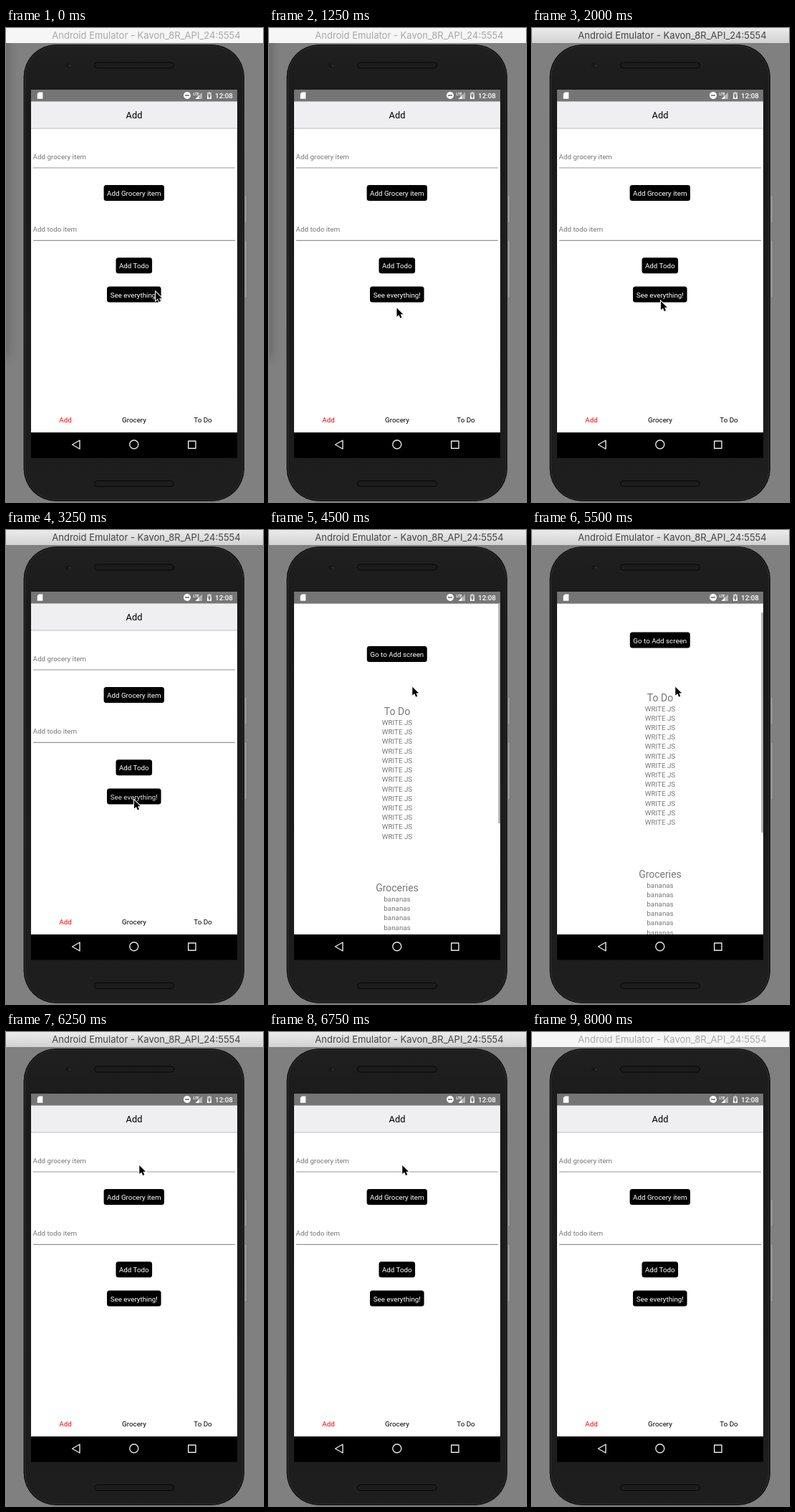
These frames come from a looping animation (359x661 px, 8.25 s). An HTML page:

```html
<!DOCTYPE html>
<html lang="en">
<head>
<meta charset="utf-8">
<title>Grocery and todo app</title>
<style>
  html, body { margin: 0; width: 100%; height: 100%; overflow: hidden; background: #808080; }
  svg { display: block; }
  text { font: 9.8px Roboto, sans-serif; text-anchor: middle; }
  .left { text-anchor: start; fill: #777; }
  .head { font-size: 14px; }
  .title { font: 13px Inter, sans-serif; }
  #list text { fill: #777; }
  #list .btn, .btn { fill: #fff; }
  #shadow { filter: blur(7px); }
</style>
</head>
<body>
<svg width="359" height="661" viewBox="0 0 359 661">
  <defs>
    <linearGradient id="bar" x2="0" y2="1"><stop stop-color="#ebebeb"/><stop offset="1" stop-color="#d2d2d2"/></linearGradient>
    <linearGradient id="body" x2="0" y2="1"><stop stop-color="#1f1f1f"/><stop offset=".15" stop-color="#1a1a1a"/><stop offset="1" stop-color="#1e1e1e"/></linearGradient>
    <clipPath id="view"><rect x="35" y="102.7" width="288" height="461.3"/></clipPath>
  </defs>

  <rect width="359" height="661" fill="#808080"/>
  <rect id="shadow" x="-20" width="24" height="460" opacity=".2"/>
  <rect id="titleBar" width="359" height="21"/>
  <text id="title" class="title" x="196" y="15">Android Emulator - Kavon_8R_API_24:5554</text>

  <!-- phone -->
  <g fill="#999" stroke="#6c6c6c" stroke-width=".6">
    <rect x="333.5" y="233" width="3" height="38"/>
    <rect x="333.5" y="296" width="3" height="80"/>
  </g>
  <rect x="24" y="22.5" width="309.5" height="638" rx="46" fill="#111" stroke="#909090" stroke-width=".9"/>
  <rect x="26.5" y="25" width="304.5" height="633" rx="43.5" fill="url(#body)" stroke="#303030"/>
  <g fill="#1c1c1c" stroke="#060606">
    <rect x="123.5" y="48" width="111" height="8" rx="4"/>
    <rect x="123.5" y="631.5" width="111" height="8" rx="4"/>
  </g>
  <circle cx="86" cy="52" r="3" fill="#171717"/>
  <circle cx="89" cy="52.5" r="1" fill="#444"/>

  <!-- status bar -->
  <rect x="35" y="86" width="288" height="17" fill="#757575"/>
  <g fill="#fff">
    <path d="M46 89.5H51.3V98.7H43.7V91.8Z"/>
    <circle cx="253" cy="94" r="5"/>
    <path d="M274 89.5V99H264.5Z" opacity=".45"/>
    <path d="M269.5 94V99H264.5Z"/>
    <text x="265.5" y="93.5" style="font-size:5px;font-weight:700">LTE</text>
    <path d="M283 89H285V90H287V99H281V90H283Z" opacity=".6"/>
    <path d="M281 94H287V99H281Z"/>
    <text x="304.5" y="97.7" style="font-weight:500">12:08</text>
  </g>
  <path d="M250 94H256M284.5 92L283 95H285L283.5 98" fill="none" stroke="#666" stroke-width="1.3"/>

  <rect x="35" y="102.7" width="288" height="461.3" fill="#fff"/>

  <g id="add">
    <rect x="35" y="102.7" width="288" height="37.3" fill="#efeff2"/>
    <path d="M35 140H323" stroke="#bcbcc0"/>
    <text x="179" y="126.3" style="font-size:12.8px">Add</text>
    <path d="M38 195H320M38 296.3H320" stroke="#959595" stroke-width="1.2"/>
    <text class="left" x="37.6" y="183.2">Add grocery item</text>
    <text class="left" x="37.6" y="284.3">Add todo item</text>
    <text x="83" y="550.3" fill="#f00">Add</text>
    <text x="179" y="550.3">Grocery</text>
    <text x="275" y="550.3">To Do</text>
  </g>

  <g id="list" clip-path="url(#view)">
    <g id="content"></g>
    <rect id="thumb" x="320.3" width="2.7" y="102" height="307" fill="#b0b0b0"/>
  </g>

  <rect x="35" y="564" width="288" height="35.5"/>
  <g fill="none" stroke="#e8e8e8" stroke-width="1.4" stroke-linejoin="round">
    <path d="M92.5 581L103 575V587Z"/>
    <circle cx="178.8" cy="580.8" r="6"/>
    <rect x="254.7" y="576" width="10.3" height="10.3"/>
  </g>
  <path id="cursor" d="M0 0V12L2.9 9.4L4.9 14L7 13.1L5.1 8.7H8.8Z" stroke="#fff" stroke-width="2" paint-order="stroke"/>
</svg>
<script>
  const LOOP = 8250;
  const $ = id => document.getElementById(id);
  const add = $('add'), list = $('list'), content = $('content'), cursor = $('cursor');

  function make(parent, tag, attrs, label = '') {
    const el = document.createElementNS('http://www.w3.org/2000/svg', tag);
    for (const key in attrs) el.setAttribute(key, attrs[key]);
    el.textContent = label;
    parent.append(el);
    return el;
  }

  function button(parent, y, width, label) {
    make(parent, 'rect', { x: 178.8 - width / 2, y, width, height: 22, rx: 3.5 });
    return make(parent, 'text', { class: 'btn', x: 178.8, y: y + 15 }, label);
  }

  function section(y, heading, item, count) {
    make(content, 'text', { class: 'head', x: 179, y }, heading);
    for (let i = 0; i < count; i++)
      make(content, 'text', { x: 179, y: y + 14 + i * 13.22 }, item);
  }

  button(add, 219, 84.4, 'Add Grocery item');
  button(add, 320.2, 50.6, 'Add Todo');
  const seeAll = button(add, 360.5, 75.6, 'See everything!');
  button(content, 162, 84, 'Go to Add screen');
  section(258, 'To Do', 'WRITE JS', 13);
  section(504, 'Groceries', 'bananas', 9);

  // Each step holds from its time until the next: [ms, ...values]
  const moves = [
    [0, 209, 368], [250, 208.5, 371], [500, 201.5, 389.5], [750, 172.5, 441.5],
    [1000, 167.5, 448.5], [1250, 178.5, 390.5], [1500, 180, 381], [2750, 179.5, 380],
    [3000, 179, 376.5], [4250, 207, 279.5], [4500, 200.3, 218.7],
    [6250, 186.3, 186], [7250, 162.5, 241.5], [7500, 118.5, 299.5]
  ];
  const scrolls = [[0, 0], [5000, 10.5], [5250, 12], [5500, 19.5]];
  const at = (steps, t) => steps.findLast(s => s[0] <= t);
  const show = (el, on) => el.setAttribute('visibility', on ? 'visible' : 'hidden');

  function draw() {
    const t = performance.now() % LOOP;
    const active = t >= 2000 && t < 8000;
    const listOpen = t >= 3500 && t < 6000;
    const [, x, y] = at(moves, t);
    const scroll = at(scrolls, t)[1];

    $('titleBar').setAttribute('fill', active ? 'url(#bar)' : '#f6f6f6');
    $('title').setAttribute('fill', active ? '#444' : '#a8a8a8');
    show($('shadow'), t < 2000);
    show(add, !listOpen);
    show(list, listOpen);
    show(cursor, t < 7750);
    seeAll.style.opacity = t >= 3250 && t < 3500 ? .88 : 1;
    cursor.setAttribute('transform', `translate(${x} ${y})`);
    content.setAttribute('transform', `translate(0 ${-scroll})`);
    $('thumb').setAttribute('transform', `translate(0 ${scroll * .665})`);
    requestAnimationFrame(draw);
  }
  draw();
</script>
</body>
</html>
```
